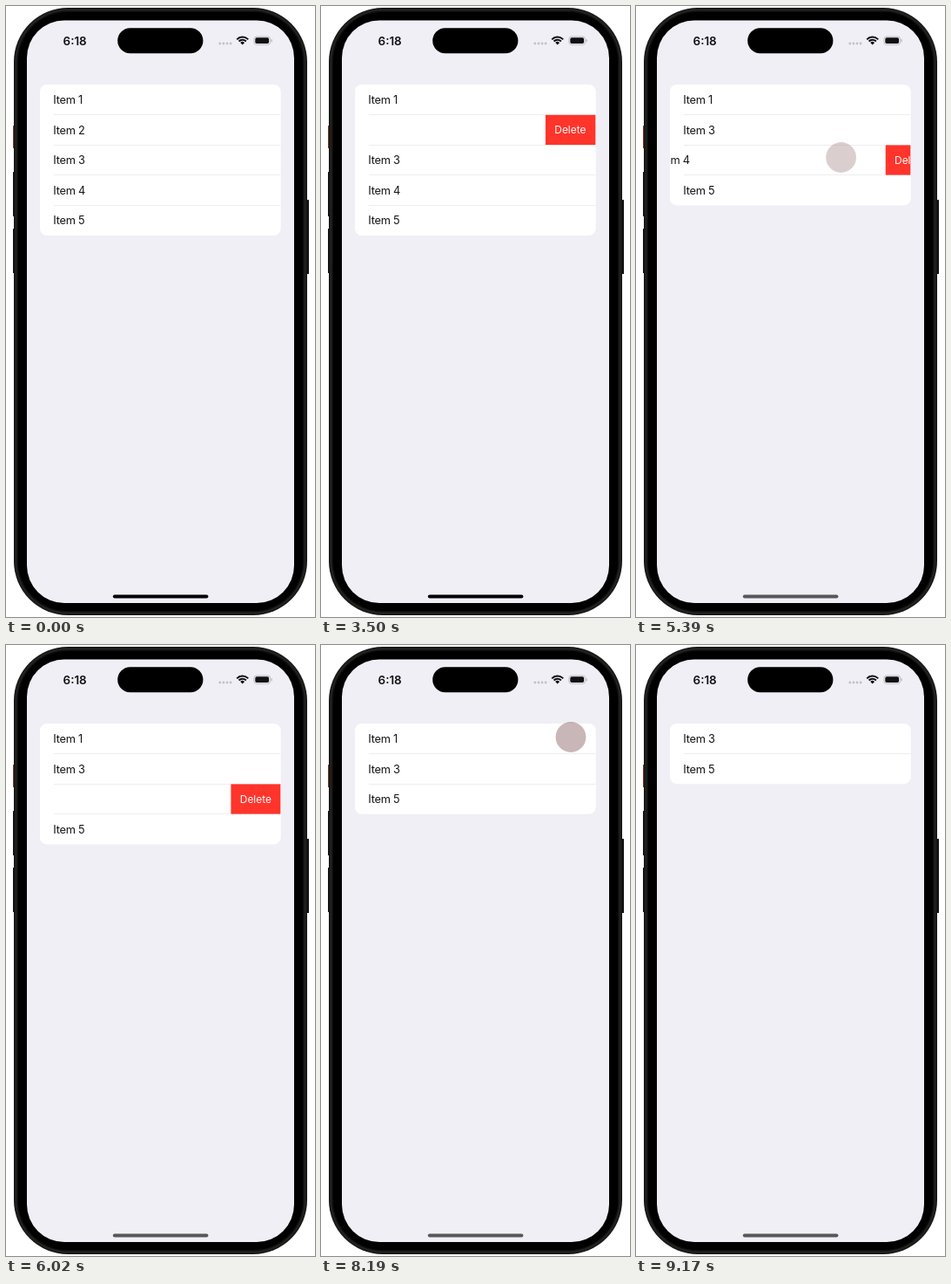
Animation of 355x700 px, one loop 9210 ms. Source, as an HTML page with a canvas:

```html
<!DOCTYPE html>
<html lang="en">
<head>
<meta charset="utf-8">
<title>Swipe to delete</title>
<style>
  html, body { margin: 0; width: 100%; height: 100%; overflow: hidden; background: #fff; }
  canvas { display: block; width: 355px; height: 700px; }
</style>
</head>
<body>
<canvas id="stage"></canvas>
<script>
const W = 355, H = 700, LOOP = 9210, TICK = 70;
const canvas = document.getElementById('stage');
const ctx = canvas.getContext('2d');
const scale = window.devicePixelRatio || 1;
canvas.width = W * scale;
canvas.height = H * scale;

const FONT = 'Inter, Roboto, sans-serif';
const CARD = { x: 39, y: 90, w: 276.7, row: 34.6, r: 8 };
const RIGHT = CARD.x + CARD.w;
const BUTTON = 58.4, PAD = 11.4;
const ITEMS = ['Item 1', 'Item 2', 'Item 3', 'Item 4', 'Item 5'];

// One entry per swiped row: touch point, touch time and deletion time
const SWIPES = [
  { row: 1, x: 288, y: 144.5, start: 2310, del: 3840, settle: 560 },
  { row: 3, x: 284, y: 173.5, start: 4970, del: 6710, settle: 560 },
  { row: 0, x: 287, y: 105.5, start: 8190, del: 8700, settle: 470, full: true }
];
const TAP = { x: 288, y: 176.5, start: 6090, hold: 140, end: 6510 };

const clamp = v => Math.min(1, Math.max(0, v));
const mix = (a, b, p) => a + (b - a) * p;
const ramp = (t, a, b) => clamp((t - a) / (b - a));
const sine = p => 0.5 - 0.5 * Math.cos(Math.PI * p);

// Critically damped spring; t in ms, w in 1/s
function spring(t, w) {
  const k = Math.max(0, t) * w / 1000;
  return 1 - (1 + k) * Math.exp(-k);
}

function finger(s, t) {
  const u = t - s.start;
  if (u < 0) return { dx: 0, dy: 0, alpha: 0 };
  if (s.full) {
    const p = sine(ramp(u, 130, 630));
    return { dx: 243.5 * p, dy: 2.4 * p, alpha: 1 - ramp(u, 540, 700) };
  }
  return { dx: 58 * sine(ramp(u, 90, 540)), dy: 0, alpha: 1 - ramp(u, 370, 530) };
}

function rowState(i, t) {
  const s = SWIPES.find(v => v.row === i);
  if (!s || t < s.start) return { off: 0, gone: 0, snap: 0 };
  const gone = clamp(spring(t - s.del, 10.5) / spring(s.settle, 10.5));
  const pulled = s.full
    ? 0.73 * finger(s, Math.min(t, s.del)).dx
    : BUTTON * spring(t - s.start - 180, 7);
  return {
    off: mix(pulled, CARD.w, gone),
    gone,
    snap: s.full ? sine(ramp(t, s.del - 70, s.del + 70)) : ramp(t, s.del - 1, s.del)
  };
}

function box(x, y, w, h, r, color) {
  ctx.beginPath();
  ctx.roundRect(x, y, w, h, r);
  if (color) {
    ctx.fillStyle = color;
    ctx.fill();
  }
}

function disc(x, y, r, color) {
  ctx.beginPath();
  ctx.arc(x, y, r, 0, Math.PI * 2);
  ctx.fillStyle = color;
  ctx.fill();
}

function label(str, x, y, size, color, weight = 400, spacing = 0) {
  ctx.font = `${weight} ${size}px ${FONT}`;
  ctx.letterSpacing = spacing + 'px';
  ctx.fillStyle = color;
  ctx.textBaseline = 'alphabetic';
  ctx.fillText(str, x, y);
}

function drawPhone() {
  // Side buttons
  box(8, 137, 4, 26, 0.5, '#7a3a22');
  box(8, 190, 4, 51, 0.5, '#111');
  box(8, 255, 4, 51, 0.5, '#111');
  box(344, 222, 4, 85, 0.5, '#111');

  // Metal edge, bezel and screen
  box(9, 2, 337, 696, 62, '#171717');
  box(10.5, 3.5, 334, 693, 60.5, '#222221');
  box(12.5, 5.5, 330, 689, 58.5, '#0e0e0e');
  box(14, 7, 327, 686, 57, '#000');
  box(24, 16.5, 307, 667.5, 43, '#f0eff5');
  box(128.2, 25.2, 98.2, 29, 14.5, '#000');
}

function drawStatus() {
  label('6:18', 65.6, 44.6, 13.4, '#101012', 600);
  for (let i = 0; i < 4; i++) disc(245.8 + i * 4.1, 43, 1.4, '#c2c1c7');

  // Wi-Fi: a wedge of rings around one point
  const cx = 271.7, cy = 44.4, a0 = -Math.PI * 0.76, a1 = -Math.PI * 0.24;
  ctx.strokeStyle = '#101012';
  ctx.lineWidth = 1.9;
  for (const r of [5.7, 8.9]) {
    ctx.beginPath();
    ctx.arc(cx, cy, r, a0, a1);
    ctx.stroke();
  }
  ctx.beginPath();
  ctx.moveTo(cx, cy);
  ctx.arc(cx, cy, 3.4, a0, a1);
  ctx.fillStyle = '#101012';
  ctx.fill();

  box(284.9, 35.1, 18.8, 9.2, 3);
  ctx.strokeStyle = '#b9b8be';
  ctx.lineWidth = 0.9;
  ctx.stroke();
  box(286.3, 36.3, 15.8, 6.8, 1.8, '#101012');
  box(304.6, 38.1, 1.2, 3.2, 0.6, '#b9b8be');
}

function drawRow(name, y, h, state, last) {
  ctx.save();
  ctx.beginPath();
  ctx.rect(CARD.x, y, CARD.w, h);
  ctx.clip();
  label(name, 54.3 - state.off, y + 22, 12.8, '#161617', 400, -0.25);
  ctx.restore();

  if (!last && !state.gone) {
    ctx.fillStyle = '#eeeef0';
    ctx.fillRect(55, Math.floor(y + h), RIGHT - 55, 1);
  }
  if (state.off < 0.1) return;

  const left = RIGHT - state.off;
  const rest = Math.max(left + PAD, RIGHT - BUTTON + PAD);
  ctx.save();
  ctx.beginPath();
  ctx.rect(left, y, state.off, h);
  ctx.clip();
  ctx.fillStyle = '#ff342b';
  ctx.fillRect(left, y, state.off, h);
  label('Delete', mix(rest, left + PAD, state.snap) - 0.8, y + 21.8, 11.9, '#fff');
  ctx.restore();
}

function drawList(t) {
  const rows = ITEMS.map((name, i) => {
    const state = rowState(i, t);
    return { name, state, h: CARD.row * (1 - state.gone) };
  }).filter(r => r.h > 0);
  const height = rows.reduce((sum, r) => sum + r.h, 0);

  ctx.save();
  box(CARD.x, CARD.y, CARD.w, height, CARD.r, '#fff');
  ctx.clip();
  let y = CARD.y;
  rows.forEach((r, i) => {
    drawRow(r.name, y, r.h, r.state, i === rows.length - 1);
    y += r.h;
  });
  ctx.restore();
}

function drawTouch(x, y, alpha) {
  if (alpha > 0) disc(x, y, 17.4, `rgba(147, 113, 115, ${0.5 * alpha})`);
}

function drawTouches(t) {
  for (const s of SWIPES) {
    const f = finger(s, t);
    drawTouch(s.x - f.dx, s.y + f.dy, f.alpha);
  }
  if (t >= TAP.start) drawTouch(TAP.x, TAP.y, 1 - ramp(t, TAP.start + TAP.hold, TAP.end));
}

function draw(t) {
  ctx.setTransform(scale, 0, 0, scale, 0, 0);
  ctx.fillStyle = '#fff';
  ctx.fillRect(0, 0, W, H);
  drawPhone();
  drawStatus();
  drawList(t);

  const tone = Math.round(88 * ramp(t, 3850, 4340));
  box(122.8, 674.5, 109.6, 4, 2, `rgb(${tone}, ${tone}, ${tone})`);

  ctx.save();
  box(24, 16.5, 307, 667.5, 43);
  ctx.clip();
  drawTouches(t);
  ctx.restore();
}

const begin = performance.now();
function loop() {
  const t = (performance.now() - begin) % LOOP;
  draw(Math.floor(t / TICK) * TICK);
  requestAnimationFrame(loop);
}
loop();
</script>
</body>
</html>
```
